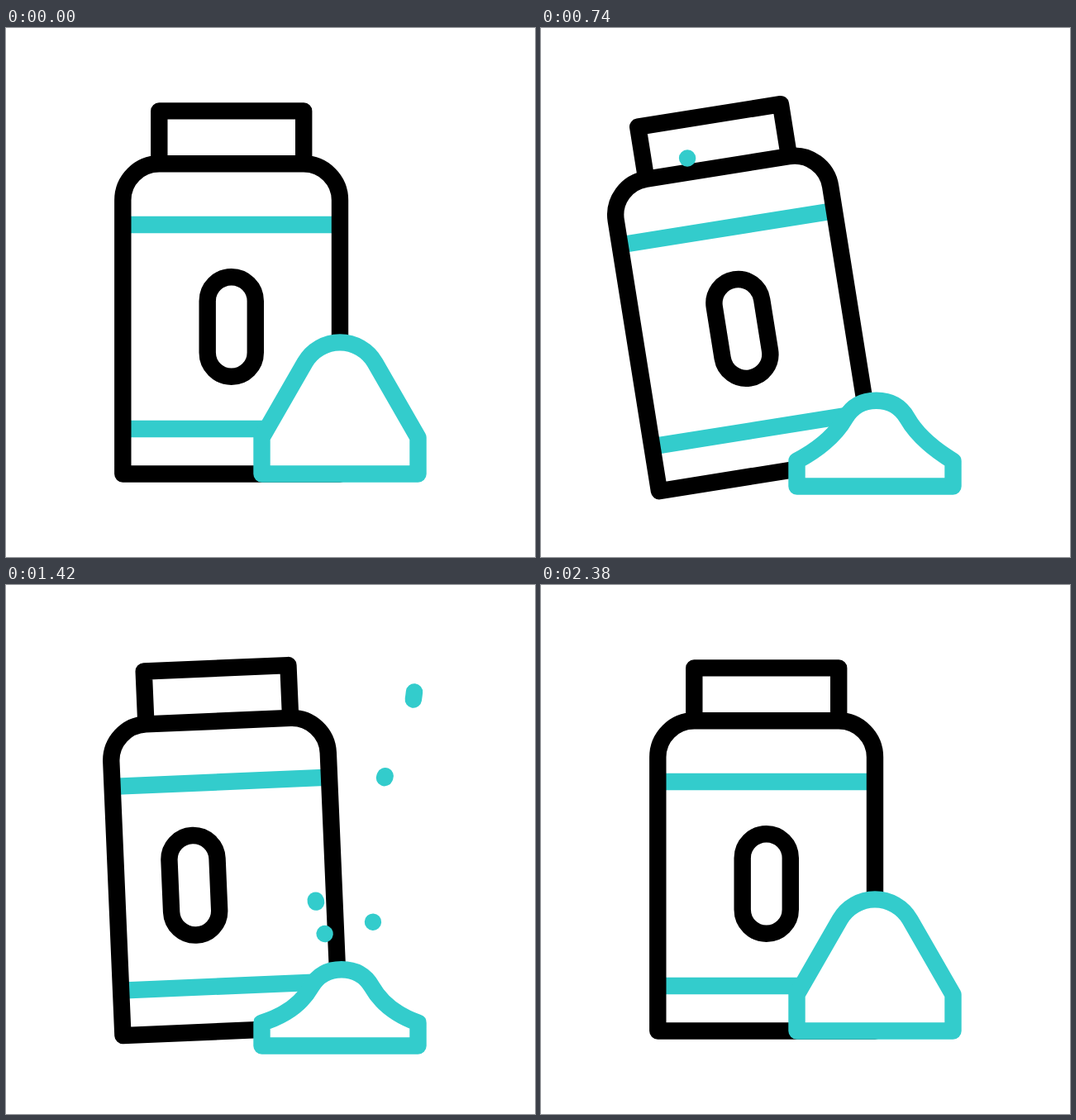
These frames come from a looping animation (640 by 640 pixels, 2400 ms). An HTML page:

```html
<!DOCTYPE html>
<html lang="en">
<head>
<meta charset="utf-8">
<title>Powder bottle</title>
<style>
  html, body { margin: 0; width: 100%; height: 100%; overflow: hidden; background: #fff; }
  svg { display: block; width: 100%; height: 100%; }
  path, rect { stroke-width: 20.4; stroke-linejoin: round; fill: none; }
  .ink { stroke: #000; }
  .teal { stroke: #33cccc; }
  .grain { stroke-linecap: round; }
  #pile { fill: #fff; }
</style>
</head>
<body>
<svg viewBox="0 0 640 640">
  <defs>
    <clipPath id="label"><rect x="130.7" y="160" width="284" height="384"/></clipPath>
  </defs>
  <g id="bottle">
    <path class="teal" d="M141.3 238H404M141.3 485H404"/>
    <g clip-path="url(#label)">
      <rect id="pill" class="ink" x="243.7" y="301.2" width="58.1" height="120.6" rx="29.05"/>
    </g>
    <path class="ink" d="M185.3 164.3V100.4H360.2V164.3"/>
    <path class="ink" d="M141.3 539.5V208.3A44 44 0 0 1 185.3 164.3H360A44 44 0 0 1 404 208.3V539.5Z"/>
  </g>
  <g id="grains"></g>
  <path id="pile" class="teal"/>
</svg>
<script>
const LOOP = 2400;
const $ = id => document.getElementById(id);
const mix = (a, b, k) => a + (b - a) * k;
const smooth = u => u * u * (3 - 2 * u);

// Eased value at time t between [time, value] keys
function track(keys, t) {
  const i = keys.findIndex(k => t < k[0]);
  if (i < 0) return keys[keys.length - 1][1];
  if (i === 0) return keys[0][1];
  const [a, from] = keys[i - 1], [b, to] = keys[i];
  return mix(from, to, smooth((t - a) / (b - a)));
}

// The bottle rocks to rest; the label leaves right and comes back from the left
const TILT = [[0, 0], [585, -17.8], [1000, 9.7], [1320, -4.2], [1610, 2.1], [1870, 0]];
const SLIDE = [[0, 0], [585, -89], [1000, 187], [1000, -192], [1587, 0]];
const SAG = [[160, 0], [966, 1], [1335, 1], [2260, 0]];

// Symmetric heap: each side is a slope (shoulder to hip) and half of a dome
function pileShape(k) {
  const m = (a, b) => mix(a, b, k);
  const base = m(539.5, 558), top = m(380.4, 467.3), mid = m(404, 406);
  const shoulder = [94.5, m(495.5, 530.5)];
  const hip = [m(42.5, 36.5), m(405, 488)];
  const side = [
    shoulder,
    [m(68.5, 69), m(450, 523)],
    [m(53, 49), m(423, 510)],
    hip,
    [m(33.7, 28), m(389.8, 473)],
    [m(17.5, 15), top]
  ];
  const place = dir => ([x, y], i) => {
    const c = i ? mid : 404;
    return `${(c + dir * x).toFixed(2)} ${y.toFixed(2)}`;
  };
  const left = side.map(place(-1)), right = side.map(place(1)).reverse();
  return `M309.5 ${base}L${left[0]}C${left.slice(1)},${mid} ${top}C${right}L498.5 ${base}Z`;
}

const LEFT = 'M142 106C152 132 178 163 205 181S300 235 325 268S366 350 375 383S388 428 398 475';
const FALL = 'M495 110C495 160 476 192 459.5 229.5S';
const OUTER = FALL + '447 350 444 407S440 445 436 480';
const INNER = FALL + '418 350 411 414S408 440 407 450';

// Path, start, duration, easing power, trail length
const GRAINS = [
  [LEFT, 730, 984, 0.438, 0],
  [LEFT, 800, 970, 0.639, 123],
  [OUTER, 1073, 500, 0.6, 0],
  [INNER, 1305, 320, 1, 13],
  [INNER, 1388, 394, 1, 13]
].map(([d, start, span, power, trail]) => {
  const el = document.createElementNS('http://www.w3.org/2000/svg', 'path');
  el.setAttribute('d', d);
  el.setAttribute('class', 'teal grain');
  $('grains').append(el);
  const size = el.getTotalLength();
  const from = el.getPointAtLength(0).y, to = el.getPointAtLength(size).y;
  return { el, start, span, power, trail, size, from, to };
});

// Distance along a descending path at which it reaches height y
function reach({ el, size }, y) {
  let lo = 0, hi = size;
  for (let i = 0; i < 13; i++) {
    const half = (lo + hi) / 2;
    if (el.getPointAtLength(half).y < y) lo = half; else hi = half;
  }
  return lo;
}

function drawGrain(g, t) {
  const u = (t - g.start) / g.span;
  const on = u >= 0 && u < 1;
  g.el.style.display = on ? '' : 'none';
  if (!on) return;
  const head = reach(g, mix(g.from, g.to, u ** g.power));
  const dash = Math.max(0.1, Math.min(head, g.trail * (1 - u) ** 4));
  g.el.setAttribute('stroke-dasharray', `${dash} 2000`);
  g.el.setAttribute('stroke-dashoffset', dash - head);
}

function draw(t) {
  $('bottle').setAttribute('transform', `rotate(${track(TILT, t)} 272.7 539.5)`);
  $('pill').setAttribute('transform', `translate(${track(SLIDE, t)} 0)`);
  $('pile').setAttribute('d', pileShape(track(SAG, t)));
  GRAINS.forEach(g => drawGrain(g, t));
}

const start = performance.now();
function tick() {
  draw((performance.now() - start) % LOOP);
  requestAnimationFrame(tick);
}
draw(0);
tick();
</script>
</body>
</html>
```
